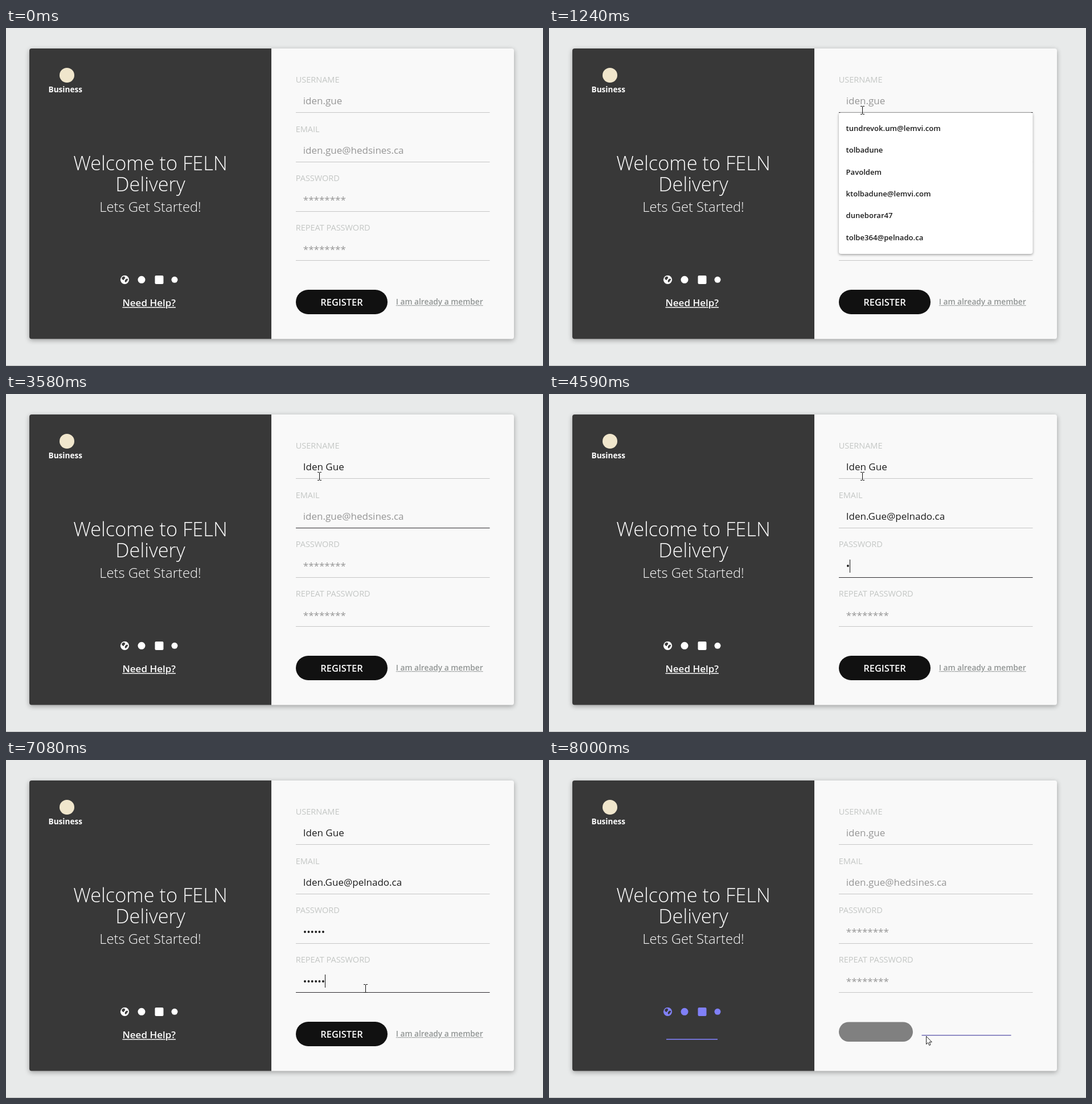
These frames come from a looping animation (943 px wide and 594 px high, 8060 ms). An HTML page with a canvas:

```html
<!DOCTYPE html>
<html lang="en">
<head>
<meta charset="utf-8">
<title>Register form</title>
<style>
  html, body { margin: 0; width: 100%; height: 100%; overflow: hidden; background: #e8eaea; }
  canvas { display: block; }
</style>
</head>
<body>
<canvas id="stage" width="943" height="594"></canvas>
<script>
const ctx = document.getElementById('stage').getContext('2d');
const LOOP = 8060;
const DARK = '#383838', LIGHT = '#f9f9f9', INK = '#1c1c1c';
const FIELD_X = 509, FIELD_W = 340.5, TEXT_X = 521.8;

const NAME = 'Iden Gue';
const MAIL = 'Iden.Gue@pelnado.ca';
const FIELDS = [
  { label: 'USERNAME', hint: 'iden.gue', labelY: 96, y: 134, line: 148 },
  { label: 'EMAIL', hint: 'iden.gue@hedsines.ca', labelY: 183, y: 221, line: 235 },
  { label: 'PASSWORD', hint: '********', labelY: 269, y: 308, line: 322 },
  { label: 'REPEAT PASSWORD', hint: '********', labelY: 356, y: 395, line: 408 }
];
const SAVED = ['tundrevok.um@lemvi.com', 'tolbadune', 'Pavoldem',
  'ktolbadune@lemvi.com', 'duneborar47', 'tolbe364@pelnado.ca'];

// Timeline: each entry changes part of the state at its time.
const START = { values: ['', '', '', ''], focus: -1, caret: false, list: null, cursor: null, load: 0 };
const timeline = [];
const at = (time, change) => timeline.push([time, change]);
const move = (time, kind, x, y) => at(time, { cursor: [kind, x, y] });
const type = (time, field, text, extra) =>
  at(time, { field, text, caret: true, ...extra });
const dots = n => '•'.repeat(n);

move(70, 'arrow', 757, 462);
move(150, 'arrow', 714, 384);
move(230, 'arrow', 650, 272);
move(310, 'arrow', 592, 166);
move(380, 'beam', 559, 113);
move(550, 'beam', 554, 127);
move(630, 'beam', 550, 144);
at(710, { focus: 0, caret: true });
at(790, { list: SAVED });
at(1240, { caret: false });
[1320, 1640, 1790, 1870, 2020, 2480, 2630, 2800].forEach((time, i) =>
  type(time, 0, NAME.slice(0, i + 1), { list: i < 7 ? [NAME] : null }));
at(3050, { focus: 1, caret: true });
at(3580, { caret: false });
type(3650, 1, MAIL);
at(3960, { focus: 2, caret: true });
at(4510, { caret: false });
[4580, 4660, 4740, 4820, 4890, 5060].forEach((time, i) => type(time, 2, dots(i + 1)));
at(5290, { focus: 3, caret: true });
[5610, 5680, 5760, 5840].forEach((time, i) => type(time, 3, dots(i + 1)));
type(6070, 3, dots(6));
at(6610, { caret: false });
[6690, 6770, 6850, 6920, 7000, 7080].forEach((time, i) => {
  const u = (i + 1) / 6, e = u * u * (3 - 2 * u);
  move(time, 'beam', Math.round(550 + 81 * e), Math.round(144 + 257 * e));
});
at(7080, { caret: true });
move(7310, 'arrow', 635, 420);
move(7390, 'arrow', 643, 445);
move(7460, 'hand', 654, 470);
move(7540, 'hand', 662, 486);
at(7620, { caret: false });
at(7690, { focus: -1 });
at(7930, { values: START.values, load: 1, cursor: ['arrow', 662, 485] });
at(8000, { load: 2 });

function stateAt(time) {
  const state = { ...START, values: [...START.values] };
  for (const [when, change] of timeline) {
    if (when > time) break;
    const { field, text, ...rest } = change;
    Object.assign(state, rest);
    if (field !== undefined) state.values[field] = text;
  }
  return state;
}

function setFont(size, weight) {
  ctx.font = `${weight} ${size}px "Open Sans", "Noto Sans", sans-serif`;
}

function label(text, x, y, size, color, weight = 400, align = 'left') {
  setFont(size, weight);
  ctx.textAlign = align;
  ctx.fillStyle = color;
  ctx.fillText(text, x, y);
}

function rect(x, y, w, h, color) {
  ctx.fillStyle = color;
  ctx.fillRect(x, y, w, h);
}

function box(x, y, w, h, r, color) {
  ctx.beginPath();
  ctx.roundRect(x, y, w, h, r);
  ctx.fillStyle = color;
  ctx.fill();
}

function disc(x, y, r, color) {
  ctx.beginPath();
  ctx.arc(x, y, r, 0, Math.PI * 2);
  ctx.fillStyle = color;
  ctx.fill();
}

function shape(points, x, y, fill, stroke) {
  ctx.beginPath();
  points.forEach(([px, py]) => ctx.lineTo(x + px, y + py));
  ctx.closePath();
  ctx.fillStyle = fill;
  ctx.fill();
  if (!stroke) return;
  ctx.strokeStyle = stroke;
  ctx.lineWidth = 1;
  ctx.stroke();
}

function withShadow(blur, dy, alpha, draw) {
  ctx.save();
  ctx.shadowColor = `rgba(0,0,0,${alpha})`;
  ctx.shadowBlur = blur;
  ctx.shadowOffsetY = dy;
  draw();
  ctx.restore();
}

// Underlined text whose line leaves gaps around descenders.
function link(text, x, y, size, color, back, lineY, lineH) {
  setFont(size, 600);
  ctx.textAlign = 'left';
  rect(x, lineY, ctx.measureText(text).width, lineH, color);
  ctx.strokeStyle = back;
  ctx.lineWidth = 2.5;
  ctx.lineJoin = 'round';
  ctx.save();
  ctx.beginPath();
  ctx.rect(x - 2, lineY - 1, 200, lineH + 2);
  ctx.clip();
  ctx.strokeText(text, x, y);
  ctx.restore();
  label(text, x, y, size, color, 600);
}

function drawIcons(color) {
  disc(208.5, 442.3, 7.6, color);
  shape([[-5, -4], [-1, -6], [1, -3], [-1, -1], [-2, 1], [-5, -1]], 208.5, 442.3, DARK);
  shape([[1, 0], [4, -2], [6, 0], [4, 2], [2, 5], [0, 3]], 208.5, 442.3, DARK);
  disc(238, 442.3, 6.5, color);
  box(261.5, 435, 15, 15, 2, color);
  disc(296, 442.3, 5.5, color);
}

function drawIntro(load) {
  const shown = load !== 1;
  if (shown) {
    disc(107, 83, 13, '#f0e6cc');
    label('Business', 74.5, 113, 13.6, '#fff', 700);
    label('Welcome to FELN', 253.5, 250, 34.4, '#fff', 300, 'center');
    label('Delivery', 253.5, 287, 34.4, '#fff', 300, 'center');
    label('Lets Get Started!', 253.5, 323, 23.8, '#fff', 300, 'center');
    drawIcons(load ? '#8080f8' : '#fff');
  }
  if (load) rect(206, 490, 90, 1.6, load === 1 ? '#0000ee' : '#8080f8');
  else link('Need Help?', 204.5, 489, 17, '#fff', DARK, 490.3, 1.5);
}

function drawField(field, value, focused, state) {
  const shown = state.load !== 1;
  if (shown) {
    label(field.label, 508.7, field.labelY, 14.5, '#c4c7c5');
    label(value || field.hint, TEXT_X, field.y, 17, value ? INK : '#969696');
  }
  rect(FIELD_X, field.line, FIELD_W, 1, focused ? '#2c2a2e' : '#c6c6c6');
  if (focused && state.caret) {
    setFont(17, 400);
    const w = value ? ctx.measureText(value).width : 0;
    rect(Math.floor(TEXT_X + w), field.line - 31, 1, 23, '#111');
  }
}

function drawList(items) {
  const h = items.length === 1 ? 56.5 : 248.5;
  withShadow(4, 1.5, 0.38, () => box(FIELD_X, 148.5, FIELD_W, h, 4, '#fff'));
  items.forEach((item, i) =>
    label(item, 521.5, Math.round(181 + 38.3 * i), 13.1, '#1b1b1b', 600));
}

function drawActions(load) {
  if (load) {
    box(509, 460.5, 130, 34.5, 17.25, load === 1 ? '#e4e4e4' : '#808080');
    rect(654.5, 483.2, 157, 1.2, load === 1 ? '#0000ee' : '#4c46a4');
    return;
  }
  box(509, 460, 161, 43, 21.5, '#111');
  label('REGISTER', 589.5, 488, 16.4, '#fff', 600, 'center');
  link('I am already a member', 684.8, 486, 13.7, '#919594', LIGHT, 487.2, 1);
}

const ARROW = [[0, 0], [0, 14], [3.2, 11], [5.3, 16], [7.5, 15], [5.5, 10.2], [9.8, 10.2]];
const HAND = [[-1, 0], [1, 0], [1.5, 5], [7, 6.5], [8, 8], [7, 13], [5.5, 16],
  [-1.5, 16], [-6, 9.5], [-5, 8], [-2, 10], [-2, 1]];

function drawCursor([kind, x, y]) {
  if (kind === 'arrow') shape(ARROW, x + 0.5, y + 0.5, '#fff', '#222');
  else if (kind === 'hand') shape(HAND, x + 0.5, y + 0.5, '#fff', '#222');
  else {
    rect(x, y - 6, 1, 13, '#111');
    for (const edge of [y - 7, y + 7]) {
      rect(x - 3, edge, 3, 1, '#111');
      rect(x + 1, edge, 3, 1, '#111');
    }
  }
}

function draw(time) {
  const state = stateAt(time);
  rect(0, 0, 943, 594, '#e8eaea');
  rect(0, 593, 943, 1, '#b8baba');
  withShadow(8, 2.5, 0.32, () => box(41, 36, 851, 510.5, 4, LIGHT));
  box(41, 36, 425, 510.5, [4, 0, 0, 4], DARK);
  drawIntro(state.load);
  FIELDS.forEach((field, i) => drawField(field, state.values[i], state.focus === i, state));
  drawActions(state.load);
  if (state.list) drawList(state.list);
  if (state.cursor) drawCursor(state.cursor);
}

const begin = performance.now();
function tick() {
  draw((performance.now() - begin) % LOOP);
  requestAnimationFrame(tick);
}
tick();
</script>
</body>
</html>
```
